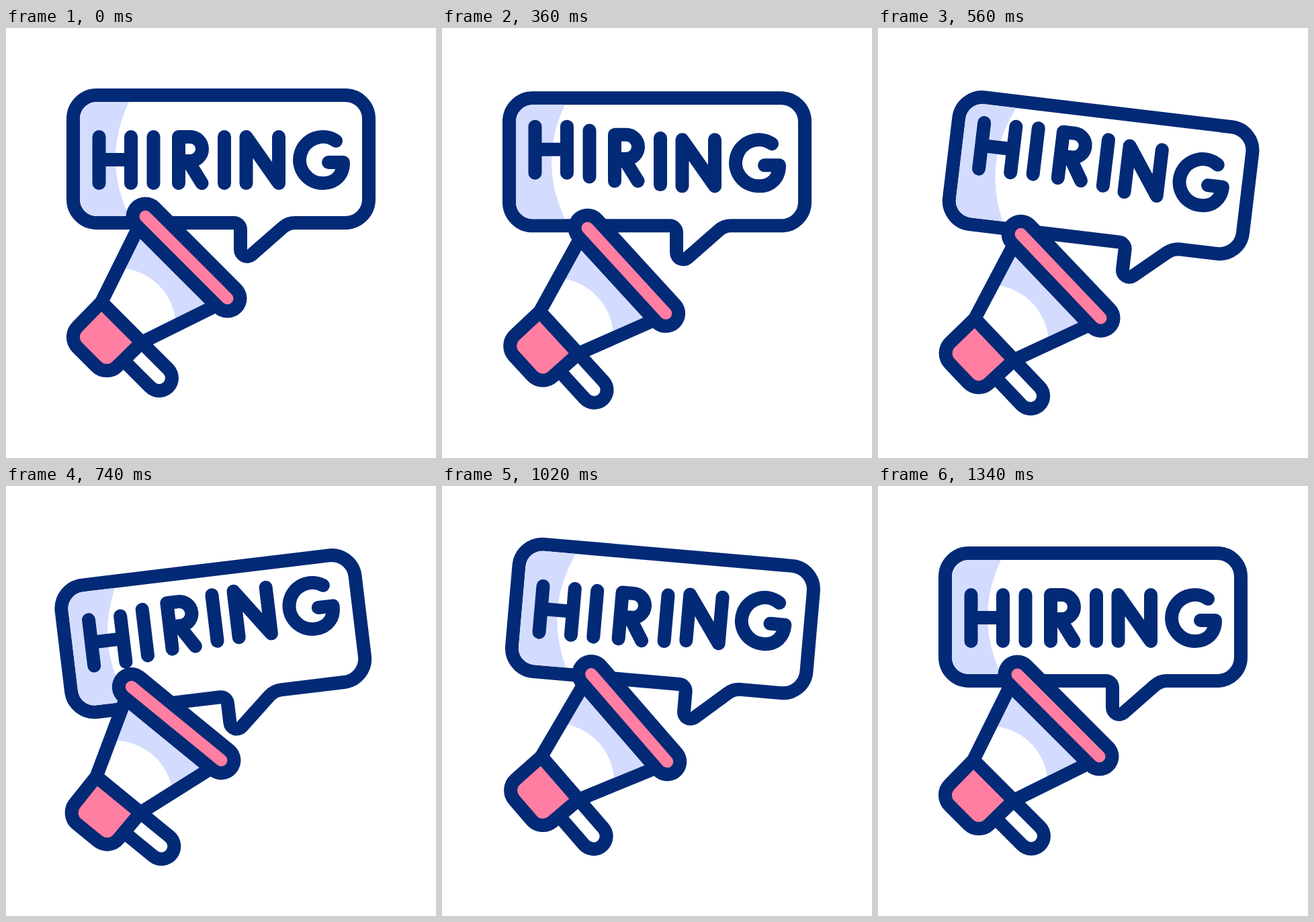
Animation, 640 px wide and 640 px high, one loop 1360 ms. Source, as an HTML page:

```html
<!DOCTYPE html>
<html lang="en">
<head>
<meta charset="utf-8">
<title>Hiring</title>
<style>
  html, body { margin: 0; width: 100%; height: 100%; overflow: hidden; background: #fff; }
  svg { display: block; width: 100vw; height: 100vh; }
  .line { fill: none; stroke: #032a76; stroke-width: 20; stroke-linecap: round; stroke-linejoin: round; }
  .thick { stroke-width: 58; }
  .core { stroke: #fff; stroke-width: 18; }
  .rose { stroke: #ff7ea1; }
  .pink { fill: #ff7ea1; }
  .shade { fill: #d3dcfe; }
  .white { fill: #fff; }
</style>
</head>
<body>
<svg viewBox="0 0 640 640" role="img" aria-label="HIRING">
  <g id="bubble">
    <path id="frame" class="line white"/>
    <path class="shade" d="M183 110Q143 195 183 280H135A25 25 0 0 1 110 255V135A25 25 0 0 1 135 110Z"/>
    <g id="word" class="line">
      <path d="M138.5 162V231M186 162V231M138.5 196H186"/>
      <path d="M219.5 162V231"/>
      <path d="M257 231V162H274A18 18 0 0 1 274 198H257M271 198L291.5 231"/>
      <path d="M325 162V231"/>
      <path d="M357.5 231V162L406 231V162"/>
      <path d="M491 168A34.5 34.5 0 1 0 472 231C490 231 502 219 502 200H480"/>
    </g>
  </g>
  <g id="horn">
    <path class="line thick" d="M190 483L228 521"/>
    <path class="line core" d="M190 483L228 521"/>
    <path class="shade" d="M197 297L142 408L202 468L313 413Z"/>
    <path class="white" d="M166.5 357A88 88 0 0 1 253 443.5L202 468L142 408Z"/>
    <path class="line" d="M197 297L142 408L202 468L313 413Z"/>
    <path class="line pink" d="M142 408L106.4 444.4A22 22 0 0 0 106.4 475.6L134.4 503.6A22 22 0 0 0 165.6 503.6L202 468Z"/>
    <path class="line thick" d="M207.5 280.5L329.5 402.5"/>
    <path class="line core rose" d="M207.5 280.5L329.5 402.5"/>
  </g>
</svg>
<script>
const LOOP = 1360, STEP = 20, FIRST = 120, STAGGER = 60;
const $ = id => document.getElementById(id);
const frame = $('frame'), bubble = $('bubble'), horn = $('horn');
const letters = [...$('word').children];

// 0 to 1 and back: a quick rise, then a longer, softer fall
function bump(t, start, peak, end) {
  if (t <= start || t >= end) return 0;
  const away = (t - peak) / (t < peak ? peak - start : end - peak);
  return (1 - away * away) ** (t < peak ? 2 : 4);
}

// Sine easing from one turning point [time, angle] to the next
function swing(t, turns) {
  const next = turns.findIndex(p => p[0] > t);
  if (next < 1) return 0;
  const [t0, a0] = turns[next - 1], [t1, a1] = turns[next];
  return a0 + (a1 - a0) * (1 - Math.cos(Math.PI * (t - t0) / (t1 - t0))) / 2;
}

const bubbleTurns = [[360, 0], [545, 7], [747, -6.9], [1040, 5.1], [1270, 0]];
const hornTurns = [[230, 0], [490, 5], [680, -7], [960, 4.5], [1250, 0]];

// Speech bubble whose tail slides along the lower edge by s
function outline(s) {
  const x = n => (n + s).toFixed(2);
  return `M135 100H505A35 35 0 0 1 540 135V255A35 35 0 0 1 505 290H${x(430)}` +
    `Q${x(420)} 290 ${x(411.8)} 297L${x(365.6)} 337.5A10 10 0 0 1 ${x(349)} 330` +
    `V300A10 10 0 0 0 ${x(339)} 290H135A35 35 0 0 1 100 255V135A35 35 0 0 1 135 100Z`;
}

function pose(el, dy, angle = 0, px = 0, py = 0) {
  el.setAttribute('transform', `translate(0 ${dy.toFixed(3)}) rotate(${angle.toFixed(3)} ${px} ${py})`);
}

function draw(now) {
  const t = Math.floor(now % LOOP / STEP) * STEP;
  const turn = swing(t, bubbleTurns);
  frame.setAttribute('d', outline(turn * 2.9));
  pose(bubble, 27 * bump(t, 275, 650, 1190), turn, 320, 293);
  pose(horn, 28 * bump(t, 200, 490, 1160), swing(t, hornTurns), 229, 488);
  letters.forEach((el, i) => {
    pose(el, -26 * bump(t - FIRST - i * STAGGER, 0, 375, 900));
  });
}

const start = performance.now();
function tick() {
  draw(performance.now() - start);
  requestAnimationFrame(tick);
}
tick();
</script>
</body>
</html>
```
